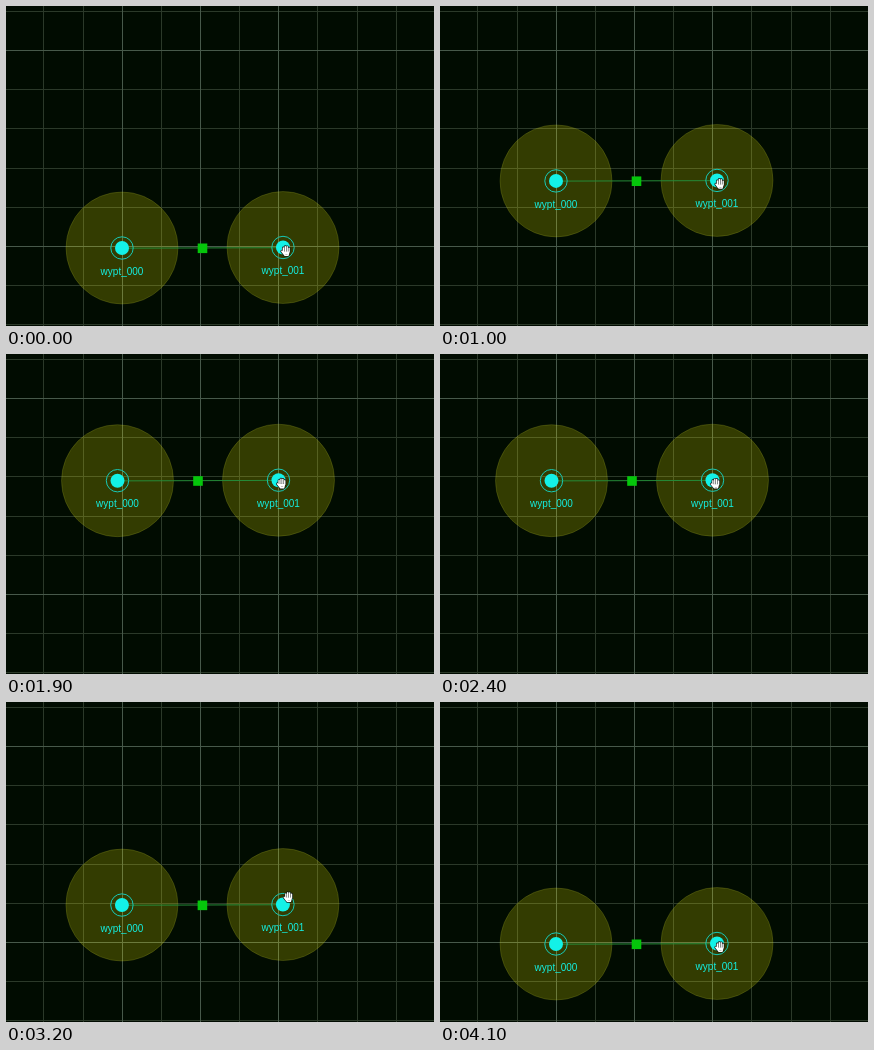
These frames come from a looping animation (428x320 px, 4.2 s). An HTML page:

```html
<!DOCTYPE html>
<html lang="en">
<head>
<meta charset="utf-8">
<title>Dragging waypoints</title>
<style>
  html, body { margin: 0; width: 100%; height: 100%; overflow: hidden; background: #010c01; }
  svg { display: block; width: 428px; height: 320px; }
  .minor { stroke: #2b3929; }
  .major { stroke: #47594a; }
  .zone { fill: rgba(255, 255, 0, .195); stroke: rgba(190, 200, 50, .2); }
  .link { stroke: #258a38; }
  .handle { fill: #05c60b; }
  .ring { fill: none; stroke: #17c8b6; }
  .dot { fill: #13f1e7; }
  text { font: 10px "Liberation Sans", Arial, sans-serif; fill: #14eee0; text-anchor: middle; }
  .hand { fill: none; stroke-linecap: round; stroke-linejoin: round; }
  .edge { stroke: #111b17; stroke-width: 2.8; }
  .skin { stroke: #fff; stroke-width: 1.4; }
</style>
</head>
<body>
<svg viewBox="0 0 428 320">
  <defs>
    <g id="waypoint">
      <circle class="ring" r="11.2"/>
      <circle class="dot" r="7"/>
    </g>
    <path id="fingers" d="M-2.6 1V-3M-.7 0V-4.4M1.2 0V-4.2M3.1 1V-2.8M-4.2 .3L-1.8 3.4M-2.2 1.2H2.8L2 4.2H-1.2ZM-1 2.6H2"/>
  </defs>
  <g id="grid"></g>
  <g id="route">
    <circle class="zone" r="56"/>
    <circle class="zone" cx="161" cy="-.5" r="56"/>
    <path class="link" d="M0 .2L161 -.3"/>
    <rect class="handle" x="75.7" y="-4.5" width="9.6" height="9.6"/>
    <use href="#waypoint"/>
    <use href="#waypoint" x="161" y="-.5"/>
    <text y="26.8">wypt_000</text>
    <text x="161" y="26.2">wypt_001</text>
  </g>
  <g id="hand" class="hand">
    <use href="#fingers" class="edge"/>
    <use href="#fingers" class="skin"/>
  </g>
</svg>
<script>
  const LOOP = 4200, STEP = 100, CELL = 39.15;
  const $ = id => document.getElementById(id);

  // Progress from 0 to 1 between two times
  const part = (t, from, to) => Math.min(1, Math.max(0, (t - from) / (to - from)));
  const easeOut = p => 1 - (1 - p) ** 2.15;
  const easeInOut = p => p * p / (p * p + (1 - p) ** 2);
  const ramp = (t, from, to) => easeInOut(part(t, from, to));
  const bump = (t, center) => Math.exp(-(((t - center) / 250) ** 2));

  // Left waypoint: up, rest, down, with a sideways drift on each trip
  function routeAt(t) {
    const lift = easeOut(part(t, 600, 1800)) - ramp(t, 2500, 3700);
    const drift = 8.5 * (ramp(t, 2900, 3230) - ramp(t, 1000, 1250))
      + 4 * (ramp(t, 1250, 1800) - ramp(t, 2500, 2850));
    return [116 + drift, 242 - 115.3 * lift];
  }

  // The hand slips ahead of the right waypoint once on each trip
  function handAt(t) {
    const [x, y] = routeAt(t);
    const up = bump(t, 1500), down = bump(t, 3200);
    return [x + 164 + 2 * up + 2.5 * down, y + 3 - 2 * up - 11 * down];
  }

  function drawGrid() {
    const line = (d, major) => `<path class="${major ? "major" : "minor"}" d="${d}"/>`;
    const snap = v => Math.floor(v) + .5;
    let minor = "", major = "";
    for (let i = 0; i < 10; i++) {
      const down = `M${snap(37.9 + i * CELL)} 0V320`;
      const across = `M0 ${snap(5.55 + i * CELL)}H428`;
      if (i > 1 && i < 7 && i % 2 === 0) major += down; else minor += down;
      if (i % 5 === 1) major += across; else minor += across;
    }
    $("grid").innerHTML = line(minor, false) + line(major, true);
  }

  const place = (id, [x, y]) => $(id).setAttribute("transform", `translate(${x} ${y})`);

  const start = performance.now();
  function tick() {
    const elapsed = (performance.now() - start) % LOOP;
    const t = Math.floor(elapsed / STEP) * STEP;
    place("route", routeAt(t));
    place("hand", handAt(t));
    requestAnimationFrame(tick);
  }

  drawGrid();
  tick();
</script>
</body>
</html>
```
